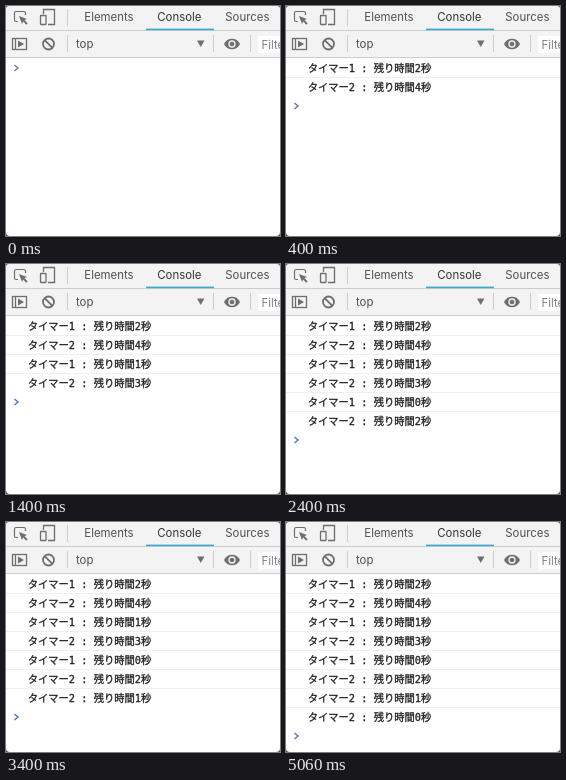
Animation of 274x230 px, one loop 5500 ms. Source, as an HTML page:

```html
<!DOCTYPE html>
<html lang="ja">
<head>
<meta charset="utf-8">
<style>
html, body { margin: 0; width: 100%; height: 100%; overflow: hidden; background: #fff; }
svg { display: block; }
.ui { font: 11.4px Inter, Roboto, sans-serif; fill: #505050; }
.log { font: 10.3px "DejaVu Sans Mono", "Noto Sans CJK JP", "Noto Sans CJK", monospace; fill: #222; stroke: #222; stroke-width: .3; white-space: pre; }
.icon { fill: none; stroke: #6e6e6e; stroke-width: 1.3; }
.solid { fill: #6e6e6e; }
</style>
</head>
<body>
<svg width="274" height="230" viewBox="0 0 274 230">
  <rect width="274" height="51" fill="#f3f3f3"/>
  <path d="M0 24.5H274M0 51.5H274" stroke="#cdcdcd"/>
  <path d="M61.5 3V20M61.5 29V46M207.5 29V46M244.5 29V46" stroke="#ccc"/>
  <rect x="140" y="22.6" width="68" height="1.6" fill="#3aa9cf"/>

  <g class="icon">
    <path d="M12 15.5H10Q8.5 15.5 8.5 14V7Q8.5 5.5 10 5.5H18Q19.5 5.5 19.5 7V9" stroke-width="1.2"/>
    <path d="M17 14L21 18" stroke-width="1.8"/>
    <path d="M37.5 8V3.5H48.5V18.5H42"/>
    <rect x="34.5" y="9.5" width="5.5" height="9" rx=".5"/>
    <rect x="6.5" y="32.5" width="14" height="11"/>
    <path d="M9.5 33V43"/>
    <circle cx="42.5" cy="38" r="5.5" stroke-width="1.8"/>
    <path d="M38.6 34.1L46.4 41.9" stroke-width="1.8"/>
  </g>
  <g class="solid">
    <path d="M13 10L21 13L17.5 14.5L16 18Z"/>
    <path d="M12 34.5L18 38L12 41.5Z"/>
    <path d="M191 34.5H198.5L194.75 41Z"/>
    <path d="M218 38C221 31 231 31 234 38C231 45 221 45 218 38Z"/>
  </g>
  <circle cx="226" cy="38" r="3" fill="#6e6e6e" stroke="#f3f3f3" stroke-width="1.3"/>

  <g class="ui">
    <text x="78.3" y="15.3">Elements</text>
    <text x="151.3" y="15.3" fill="#333">Console</text>
    <text x="219.3" y="15.3">Sources</text>
    <text x="70" y="42">top</text>
  </g>
  <rect x="252" y="30" width="40" height="17" fill="#fff"/>
  <text class="ui" x="255.5" y="42.5" style="fill:#808080">Filter</text>

  <g id="rows"></g>
  <path id="prompt" d="M8.5 -3L12 0L8.5 3" fill="none" stroke-width="1.4"/>
  <path d="M0 0H3Q0 0 0 3ZM274 0H271Q274 0 274 3ZM0 230V226Q0 230 4 230ZM274 230V226Q274 230 270 230Z" fill="#555"/>
</svg>
<script>
const LOOP = 5500, ROW = 19, FIRST = 62;
const rows = document.getElementById("rows");
const prompt = document.getElementById("prompt");
const show = (el, on) => el.setAttribute("visibility", on ? "visible" : "hidden");

// Two countdowns tick together once a second, starting at 400 ms.
const logs = [];
for (let tick = 0; tick < 5; tick++) {
  [2, 4].forEach((start, i) => {
    if (start >= tick) logs.push({ at: 400 + tick * 1000, timer: i + 1, left: start - tick });
  });
}
rows.innerHTML = logs.map(({ timer, left }, i) => {
  const y = FIRST + i * ROW;
  return `<g><text class="log" x="21.7" y="${y + 3.8}">タイマー${timer} : 残り時間${left}秒</text>
    <path d="M0 ${y + 9.5}H274" stroke="#efefef"/></g>`;
}).join("");

function draw(now) {
  const t = now % LOOP;
  const count = logs.filter(log => log.at <= t).length;
  [...rows.children].forEach((row, i) => {
    show(row.firstElementChild, i < count);
    show(row.lastElementChild, i < count - 1); // no rule above the prompt
  });
  prompt.setAttribute("transform", `translate(0 ${FIRST + count * ROW})`);
  prompt.setAttribute("stroke", t < 100 ? "#6a7f9f" : "#5673b3");
  requestAnimationFrame(draw);
}
requestAnimationFrame(draw);
</script>
</body>
</html>
```
